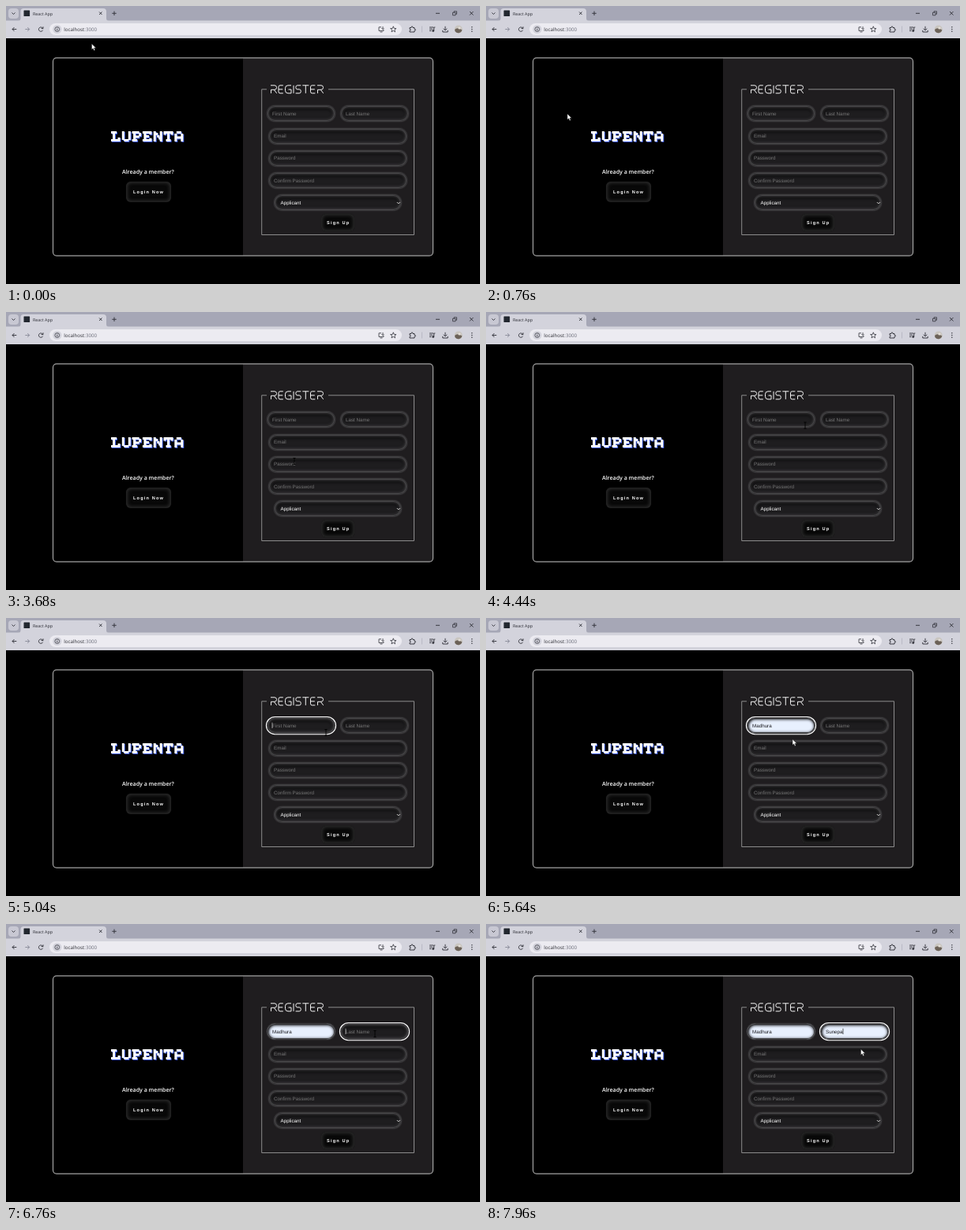
Recreate the animation shown at these times as an HTML page. Size 600x353 px, loop 8000 ms.

```html
<!DOCTYPE html>
<html lang="en">
<head>
<meta charset="utf-8">
<title>Register form</title>
<style>
  html, body { margin: 0; width: 100%; height: 100%; overflow: hidden; background: #000; }
  #stage { position: absolute; left: 0; top: 0; width: 600px; height: 353px; overflow: hidden; }
  #stage > * { position: absolute; box-sizing: border-box; }
  svg { left: 0; top: 0; }
  text { text-rendering: geometricPrecision; }
  .field {
    border-radius: 11px; background: #1e1d1f;
    border: 1px solid #3c3b3d;
    box-shadow: inset 0 0 0 1px #474648, inset 0 0 3px 2.2px #383739, inset 1px 2px 4px 2px #080808, 0 0 1.5px #4a494b;
  }
  .field.filled {
    background: #e8f0fe;
    box-shadow: inset 0 0 0 .7px #2c2c2e, inset .5px .7px 3.5px 1px #0a0a0c, 0 0 1.5px #4a494b;
  }
  .button { border-radius: 6px; background: #080808; box-shadow: inset 0 0 4px 1.8px #2c2c2c, 0 0 1px #1c1c1c; }
  .ui { font-family: "Open Sans", "Noto Sans", sans-serif; }
  .form { font: 6.25px "Liberation Sans", Arial, sans-serif; }
  .bold { font: bold 5.6px "Liberation Sans", Arial, sans-serif; letter-spacing: 1.17px; fill: #fff; }
  .line { fill: none; stroke: #33343c; stroke-width: .95; }
</style>
</head>
<body>
<div id="stage">
  <svg width="600" height="353" viewBox="0 0 600 353">
    <rect x="59.500" y="65.900" width="481" height="251.200" rx="4.500"/>
    <path d="M300 66H536Q540.500 66 540.500 70.500V312.500Q540.500 317 536 317H300Z" fill="#1f1d1f"/>
    <rect x="59.500" y="65.900" width="481" height="251.200" rx="4.500" fill="none" stroke="#a3a3a3" stroke-width="1.200"/>
  </svg>
  <div class="button" style="left:151.5px;top:222.5px;width:57px;height:26.5px"></div>
  <div class="button" style="left:399px;top:264px;width:42px;height:21.5px"></div>

  <svg id="art" width="600" height="353" viewBox="0 0 600 353">
    <!-- browser bar -->
    <rect width="600" height="20" fill="#a6a7b6"/>
    <rect y="18.500" width="600" height="22.500" fill="#d3d3dc"/>
    <rect x="3" y="3" width="13" height="13" rx="4" fill="#c8c8d3"/>
    <path d="M15 19Q18.500 19 18.500 15.500V7Q18.500 3 22.500 3H123Q127 3 127 7V15.500Q127 19 130.500 19Z" fill="#d3d3dc"/>
    <rect x="22.500" y="5.500" width="7.600" height="7.600" rx=".6" fill="#22272f"/>
    <text class="ui" x="34" y="11.700" font-size="5.35" fill="#2b2c33">React App</text>
    <rect x="55" y="22" width="446" height="15" rx="7.500" fill="#ecebf1"/>
    <circle cx="64.800" cy="29.500" r="5.600" fill="#d3d3dc"/>
    <text class="ui" x="73.300" y="31.700" font-size="6.2" fill="#2b2c33">localhost<tspan fill="#696b77">:3000</tspan></text>
    <g class="line">
      <path d="M7.500 8.500L9.500 10.500L11.500 8.500"/>
      <path d="M118 7.500L121.500 11M121.500 7.500L118 11M134.300 9.300H139.700M137 6.600V12"/>
      <path d="M544 9.300H549M587 7L591.500 11.500M591.500 7L587 11.500"/>
      <path d="M565.500 8.300H569V11.800H565.500ZM567 8V6.800H570.500V10.300H569.300" stroke-width=".8"/>
      <path d="M13.300 29.500H8M10.500 27L8 29.500L10.500 32"/>
      <path d="M24.300 29.500H29.700M27.200 27L29.700 29.500L27.200 32" stroke="#8b8d9a"/>
      <path d="M46.500 28.300A2.700 2.700 0 1 0 46.600 30.700M47 26.300V28.600H44.700"/>
      <circle cx="64.800" cy="29.500" r="2.900" stroke-width=".75"/>
      <path d="M64.800 29V31.200M64.800 27.600V28.400" stroke-width=".8"/>
      <path d="M475 26.800H472V31.500H478V30M473.500 33H476.500M477 26V29.500M475.500 28.200L477 29.700L478.500 28.200" stroke-width=".8"/>
      <path d="M490.300 25.800L491.300 28.400L494 28.500L491.900 30.200L492.600 32.900L490.300 31.400L488 32.900L488.700 30.200L486.600 28.500L489.300 28.400Z" stroke-width=".8"/>
      <path d="M511 27.500H513Q513 25.800 514 25.800T515 27.500H517V29.300Q518.500 29.300 518.500 30.300T517 31.300V33H511V31.300Q512.300 31.300 512.300 30.300T511 29.300Z"/>
      <path d="M536 27H541M536 29.200H540M536 31.400H538.500M541.700 31.500V27H543.300"/>
      <circle cx="540.700" cy="31.500" r="1" fill="#33343c"/>
      <path d="M556 25.800V30.700M553.800 28.700L556 30.900L558.200 28.700M552.800 30.800V33H559.200V30.800"/>
    </g>
    <path d="M526.500 25.500V33.500" stroke="#b3b3bf" stroke-width=".8"/>
    <circle cx="572.700" cy="29.500" r="5" fill="#c9c5c0"/>
    <path d="M568 30Q571 26.500 577.400 30.500A5 5 0 0 1 568.500 32.300Z" fill="#6c6258"/>
    <circle cx="574" cy="28" r="1.600" fill="#e5dfd7"/>
    <g fill="#33343c"><circle cx="589.800" cy="26.800" r=".75"/><circle cx="589.800" cy="29.500" r=".75"/><circle cx="589.800" cy="32.200" r=".75"/></g>

    <!-- left panel -->
    <g id="word" fill="none" stroke="#fff" stroke-width="3" style="filter:drop-shadow(1px 1px .5px #3d5ce0)" role="img" aria-label="LUPENTA"></g>
    <text class="ui" x="147" y="213.300" font-size="7.05" font-weight="600" fill="#fff">Already a member?</text>
    <text class="bold" x="161" y="237.800">Login Now</text>

    <!-- right panel -->
    <path d="M330 105.800H323.700V290.500H516.500V105.800H408" fill="none" stroke="#999" stroke-width=".9"/>
    <g id="legend" fill="none" stroke="#f4f4f4" stroke-width="1" stroke-linejoin="round" role="img" aria-label="REGISTER"></g>
    <text class="bold" x="406" y="276.700">Sign Up</text>
  </svg>

  <svg id="top" width="600" height="353" viewBox="0 0 600 353">
    <text class="form" x="347.500" y="252.100" fill="#fff">Applicant</text>
    <path d="M494.800 249L496.800 251L498.800 249" fill="none" stroke="#ddd" stroke-width=".9"/>
    <rect id="ring" y="125.500" width="88.200" height="22.200" rx="11.100" fill="none" stroke="#fff" stroke-width="1.100"/>
    <path id="caret" d="M0 132.700V140" stroke-width=".7"/>
    <path id="arrow" d="M0 0V7.300L1.700 5.800L2.900 8.500L4.200 7.900L3 5.300H5.300Z" fill="#fff" stroke="#222" stroke-width=".45"/>
    <path id="beam" d="M-1.600 -4H1.600M0 -4V4M-1.600 4H1.600" fill="none" stroke="#000" stroke-width=".9"/>
  </svg>
</div>
<script>
const LOOP = 8000, STEP = 40, BLINK = 520;
const $ = id => document.getElementById(id);
const stage = $('stage');

function add(parent, tag, attrs) {
  const el = document.createElementNS('http://www.w3.org/2000/svg', tag);
  for (const key in attrs) el.setAttribute(key, attrs[key]);
  return parent.appendChild(el);
}

// Slab letters, each in a 12 by 13 box
const slab = {
  L: 'M0 1.5H7M3.5 1.5V11.5M0 11.5H10V8',
  U: 'M2 0V11M3 11.5H9M10 0V11',
  P: 'M0 1.5H9M3 1.5V11.5M10 2V6.500M3 7H9M0 11.5H6.500',
  E: 'M0 1.5H10V4.300M3 1.5V11.5M3 6.500H8M0 11.5H10V8.700',
  N: 'M2 0V13M3 3.500H6M5 6.500H8M7 9H10M10 0V13',
  T: 'M1.500 4.500V1.5H10.500V4.500M6 1.5V11.5M3 11.5H9',
  A: 'M2 13V3M3 1.5H9M10 13V3M2 8H10'
};
[...'LUPENTA'].forEach((c, i) =>
  add($('word'), 'path', { d: slab[c], transform: `translate(${133 + i * 13.3} 159)` }));

// Thin letters, 10 high
const thin = {
  R: 'M0 0H5Q7.500 0 7.500 2.700T5 5.500H.500V10M4.300 5.500L7.700 10',
  E: 'M6.300 0H2.500Q.500 0 .500 2V8Q.500 10 2.500 10H6.300M.500 5H5.800',
  G: 'M8 0H4Q.500 0 .500 3.500V6.500Q.500 10 4 10H8V5.200H4.500',
  I: 'M0 0V10',
  S: 'M7 0H2.500Q.500 0 .500 2.500T2.500 5H5Q7 5 7 7.500T5 10H.300',
  T: 'M0 0H8M4 0V10'
};
const legendX = [335, 344.5, 353, 364, 366.3, 375.3, 385, 394];
[...'REGISTER'].forEach((c, i) =>
  add($('legend'), 'path', { d: thin[c], transform: `translate(${legendX[i]} 100.800)` }));

function makeField(x, y, w, hint, textX) {
  const box = document.createElement('div');
  box.className = 'field';
  box.style.cssText = `left:${x}px;top:${y}px;width:${w}px;height:21px`;
  stage.insertBefore(box, $('top'));
  const text = add($('top'), 'text', { class: 'form', x: textX, y: y + 12.6 });
  $('top').prepend(text);
  return { x, y, w, hint, textX, box, text };
}
const first = makeField(330, 126, 87, 'First Name', 337);
const last = makeField(423, 126, 87, 'Last Name', 430);
const fields = [
  first, last,
  makeField(332, 154.5, 176, 'Email', 339),
  makeField(332, 182.7, 176, 'Password', 339),
  makeField(332, 210.9, 176, 'Confirm Password', 339)
];
makeField(339, 239.3, 162, '', 347);

Object.assign(first, { value: 'Madhura', fillAt: 5560, focusAt: 4960, blurAt: 6560 });
Object.assign(last, { value: 'Sunepa', fillAt: 7760, focusAt: 6560, blurAt: LOOP });

// Pointer: time, x, y
const path = [
  [0, 108.5, 48], [40, 103, 66], [80, 94, 92], [120, 90, 118], [160, 101, 135],
  [280, 101, 135], [320, 103, 137], [3240, 103, 137], [3400, 190, 165], [3560, 310, 190],
  [3680, 365, 189.5], [3800, 396, 168], [3960, 403, 143], [4400, 403, 143], [4480, 405, 145],
  [5040, 405, 145.5], [5200, 401, 151], [5440, 401, 151], [5640, 388, 154], [5960, 388, 154],
  [6160, 428, 149], [6400, 466, 138], [6680, 466, 138], [6760, 467, 139.5],
  [7200, 467, 139.5], [7280, 468, 141], [7560, 468, 141], [7760, 473, 153], [7960, 474.5, 159], [LOOP, 474.5, 159]
];
// While a suggestion is being picked the pointer stays an arrow
const picking = t => (t >= 5160 && t < 6040) || t >= 7680;

function pointerAt(t) {
  const i = path.findIndex(p => p[0] > t);
  const [t0, x0, y0] = path[i - 1], [t1, x1, y1] = path[i];
  const k = (t - t0) / (t1 - t0);
  return [x0 + (x1 - x0) * k, y0 + (y1 - y0) * k];
}

function draw(t) {
  let active = null;
  for (const f of fields) {
    f.filled = t >= f.fillAt;
    f.text.textContent = f.filled ? f.value : f.hint;
    f.text.setAttribute('fill', f.filled ? '#17171b' : '#757575');
    f.box.classList.toggle('filled', f.filled);
    if (t >= f.focusAt && t < f.blurAt) active = f;
  }

  const caretOn = active && Math.floor((t - active.focusAt) / BLINK) % 2 === 0;
  $('ring').style.display = active ? '' : 'none';
  $('caret').style.display = caretOn ? '' : 'none';
  if (active) {
    const shift = active.filled ? active.text.getComputedTextLength() + .4 : 0;
    $('ring').setAttribute('x', active.x - .6);
    $('caret').setAttribute('transform', `translate(${active.textX + shift} 0)`);
    $('caret').setAttribute('stroke', active.filled ? '#111' : '#ddd');
  }

  const [x, y] = pointerAt(t);
  const overText = !picking(t) &&
    fields.some(f => x > f.x && x < f.x + f.w && y > f.y && y < f.y + 21);
  $('arrow').style.display = overText ? 'none' : '';
  $('beam').style.display = overText ? '' : 'none';
  for (const id of ['arrow', 'beam']) $(id).setAttribute('transform', `translate(${x} ${y})`);
}

const start = performance.now();
function tick() {
  const t = (performance.now() - start) % LOOP;
  draw(Math.floor(t / STEP) * STEP);
  requestAnimationFrame(tick);
}
tick();
</script>
</body>
</html>
```
